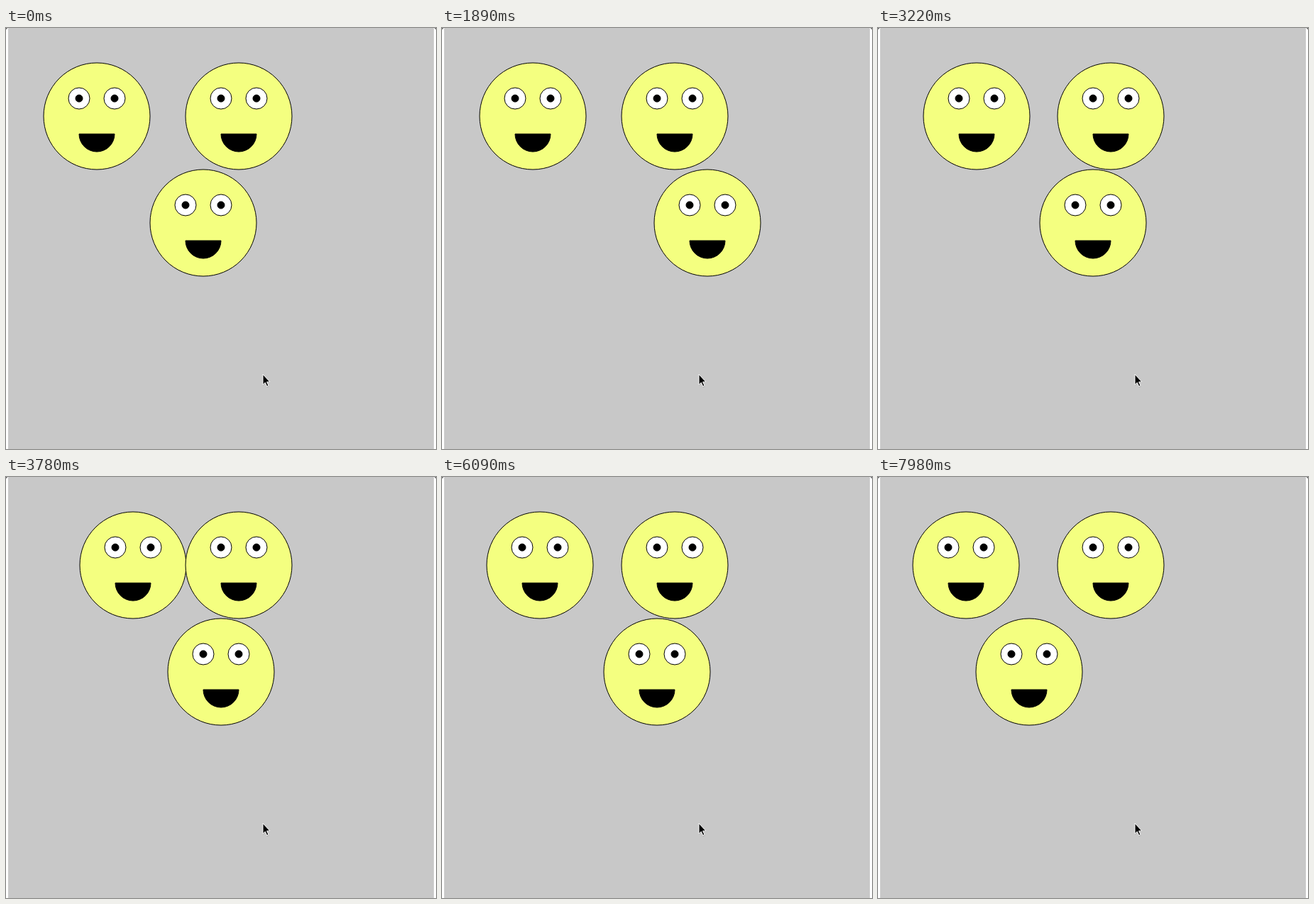
These frames come from a looping animation (606 px wide and 592 px high, 8 s). An HTML page:

```html
<!DOCTYPE html>
<html lang="en">
<head>
<meta charset="utf-8">
<title>Three faces</title>
<style>
  html, body { margin: 0; width: 100%; height: 100%; overflow: hidden; background: #fff; }
  svg { display: block; width: 606px; height: 592px; }
</style>
</head>
<body>
<svg viewBox="0 0 606 592">
  <defs>
    <g id="eye">
      <circle r="15" fill="#fff"/>
      <circle r="5"/>
    </g>
    <g id="face" stroke="#000">
      <circle r="75" fill="#f4ff80"/>
      <use href="#eye" x="-25" y="-25"/>
      <use href="#eye" x="25" y="-25"/>
      <path d="M-25 25A25 25 0 0 0 25 25Z"/>
    </g>
  </defs>
  <path d="M0 0h2v1h-1v1h-1zM606 0h-2v1h1v1h1z" fill="#777"/>
  <rect x="3" width="600" height="592" fill="#c8c8c8"/>
  <use id="left" href="#face" y="124"/>
  <use href="#face" x="328" y="124"/>
  <use id="low" href="#face" y="274"/>
  <g transform="translate(362 487)">
    <path d="M0 1.5V16L3.4 13 6 18.5 8.6 17.3 6.2 12H10.6Z" opacity=".15"/>
    <path d="M0 0V14.6L3.3 11.6 5.7 17 8 16 5.6 10.8H10Z" stroke="#fff"/>
  </g>
</svg>
<script>
const LOOP = 8000, STEP = 70;

const linear = u => u;
const easeOut = u => 1 - (1 - u) ** 2;
const move = (from, to, dx, ease = linear) =>
  t => dx * ease(Math.min(1, Math.max(0, (t - from) / (to - from))));

// Each face starts at x and adds up its sideways moves.
const faces = [
  { id: "left", x: 128, moves: [
    move(3066, 4060, 71),
    move(4410, 4760, -24),
    move(4830, 4970, -5),
    move(5040, 5250, -14),
    move(5250, 6930, -24, easeOut),
    move(7840, 7980, -8)
  ] },
  { id: "low", x: 278, moves: [
    move(420, 1820, 97),
    move(1876, 2870, -72),
    move(6425, 7700, -90)
  ] }
];

const start = performance.now();

function draw(now) {
  const time = Math.max(0, now - start) % LOOP;
  const t = Math.floor(time / STEP) * STEP;
  for (const { id, x, moves } of faces) {
    const cx = moves.reduce((sum, m) => sum + m(t), x);
    document.getElementById(id).setAttribute("x", Math.round(cx));
  }
  requestAnimationFrame(draw);
}
draw(start);
</script>
</body>
</html>
```
